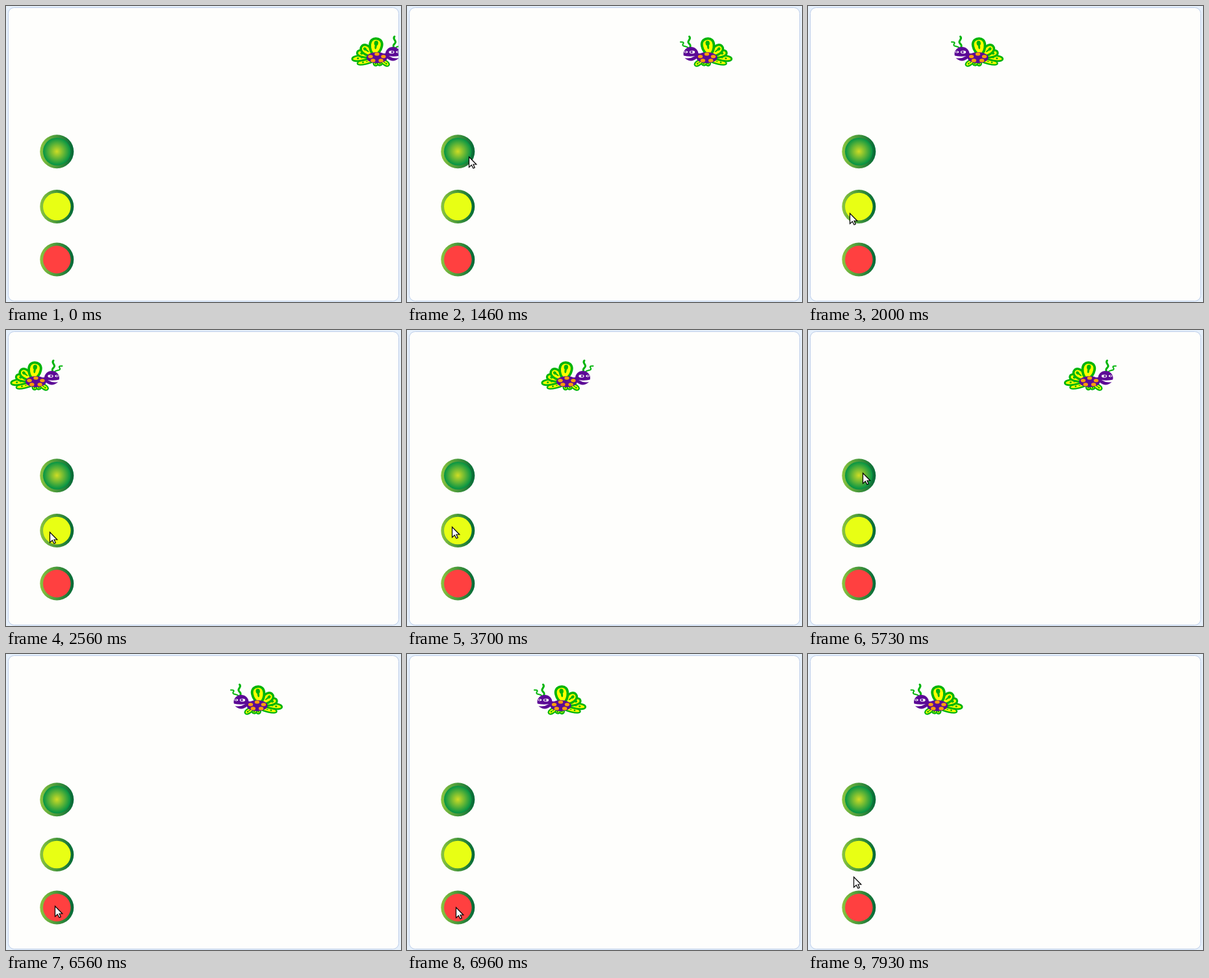
Write an HTML page with a canvas that moves like this. It is 608 px wide and 456 px high and loops after 8000 ms.

```html
<!DOCTYPE html>
<html lang="en">
<head>
<meta charset="utf-8">
<title>Butterfly and buttons</title>
<style>
html, body { margin: 0; width: 100%; height: 100%; overflow: hidden; background: #e6f0fb; }
canvas { display: block; width: 608px; height: 456px; }
</style>
</head>
<body>
<canvas id="stage" width="608" height="456"></canvas>
<script>
const ctx = document.getElementById('stage').getContext('2d');
const LOOP = 8000, STEP = 12.5, WIDTH = 82.5;
const GREEN = '#00b50a', YELLOW = '#ffff00', PURPLE = '#5c0a96', ORANGE = '#ff9d0a', WHITE = '#fefefc';

// The green button flies fast, yellow slows down, red stops
const phases = [
  { from: 1226, to: 3000, beat: 33.3 },
  { from: 3200, to: 5480, beat: 233.3 },
  { from: 5490, to: 7060, beat: 34 }
];

const moves = [
  { from: 430, to: 1060, x: 95, y: 232 },
  { from: 1500, to: 2030, x: 64, y: 320 },
  { from: 2200, to: 2900, x: 69, y: 303 },
  { from: 4400, to: 5130, x: 84, y: 220 },
  { from: 5930, to: 6600, x: 75, y: 390 },
  { from: 7630, to: 7930, x: 70, y: 343 }
];

function flight(t) {
  let steps = 0;
  for (const { from, to, beat } of phases)
    if (t >= from) steps += Math.floor((Math.min(t, to) - from) / beat) + 1;

  let x = 530, facing = 1;
  while (steps-- > 0) {
    x += STEP * facing;
    if (x > 520) { x = 507.5; facing = -1; }
    if (x < 10) { x = 5; facing = 1; }
  }
  return { x, facing };
}

function pointerAt(t) {
  let x = 0, y = 271;
  for (const m of moves) {
    const k = Math.min(1, Math.max(0, (t - m.from) / (m.to - m.from)));
    const e = k * k * (3 - 2 * k);
    x += (m.x - x) * e;
    y += (m.y - y) * e;
  }
  return { x, y };
}

function ellipse(x, y, rx, ry, fill, turn = 0) {
  ctx.beginPath();
  ctx.ellipse(x, y, rx, ry, turn, 0, Math.PI * 2);
  ctx.fillStyle = fill;
  ctx.fill();
}

function curve(path, width) {
  ctx.strokeStyle = GREEN;
  ctx.lineWidth = width;
  ctx.lineCap = 'round';
  ctx.stroke(new Path2D(path));
}

// Teardrop wing growing from its base at the given angle
function wing(x, y, angle, len, w, line) {
  ctx.save();
  ctx.translate(x, y);
  ctx.rotate(angle);
  ctx.beginPath();
  ctx.moveTo(0, 0);
  ctx.bezierCurveTo(len * .3, -w, len, -w * 1.25, len, 0);
  ctx.bezierCurveTo(len, w * 1.25, len * .3, w, 0, 0);
  ctx.fillStyle = YELLOW;
  ctx.fill();
  ctx.strokeStyle = GREEN;
  ctx.lineWidth = line;
  ctx.lineJoin = 'round';
  ctx.stroke();
  const spot = w * .29;
  ellipse(len * .74, 0, spot * 1.2, spot, GREEN);
  ellipse(len * .56, 0, spot * 1.4, spot * .5, GREEN);
  ctx.restore();
}

function wings() {
  for (let i = 3; i >= 0; i--) {
    const angle = .6 + .77 * i;
    wing(44, 36, angle, Math.min(34, 10.5 / Math.sin(angle)), 4.3, 2.2);
  }
  for (let i = 3; i >= 0; i--)
    wing(37, 32, -1.43 - 1.07 * Math.sqrt(i), 27 + 2.5 * i * (i - 2), 11 / (1 + .4 * i), 3.8 - .35 * i);
}

function body() {
  ellipse(41, 34.5, 16, 8.6, PURPLE);
  ellipse(53, 31.5, 6, 3.5, PURPLE, -.3);
  for (let i = 0; i < 5; i++) {
    const a = Math.PI * (.4 * i - .5);
    ellipse(41 + 10.5 * Math.cos(a), 34.5 + 5.5 * Math.sin(a), 3.7, 2.6, ORANGE);
  }
}

function head() {
  curve('M68 2 C64 6 72 9 69 12 C67 15 65 15 67 19', 3);
  curve('M81.5 10.5 C76 10 76 12 78 14 C79 18 74 16 70 19', 2);
  ellipse(65.5, 28.8, 11.5, 10.7, PURPLE);
  ctx.fillStyle = WHITE;
  ctx.fill(new Path2D('M59 32 Q68 34 79 31 V39 L75 35 Q67 37 59 32'));
  ellipse(63.5, 26, 4.2, 2.3, WHITE);
  ellipse(64.5, 26, 1.8, 1.4, PURPLE);
  ellipse(73, 25.8, 2.8, 1.6, WHITE);
  ellipse(73.5, 25.8, 1.1, 1, PURPLE);
}

function butterfly({ x, facing }) {
  ctx.save();
  ctx.beginPath();
  ctx.rect(4, 3, 600, 451);
  ctx.clip();
  ctx.translate(facing > 0 ? x : x + WIDTH, 45);
  ctx.scale(facing, 1);
  wings();
  body();
  head();
  ctx.restore();
}

function button(y, fill) {
  const ring = ctx.createLinearGradient(52, 0, 104.5, 0);
  ring.addColorStop(0, '#8cc63f');
  ring.addColorStop(1, '#006837');
  ellipse(78.3, y, 26, 26, ring);
  ellipse(78.3, y, 21.3, 21.3, fill);
}

function backdrop() {
  ctx.fillStyle = '#e6f0fb';
  ctx.fillRect(0, 0, 608, 456);
  ctx.beginPath();
  ctx.roundRect(3.5, 2.5, 601, 452, 9);
  ctx.fillStyle = WHITE;
  ctx.fill();
  ctx.strokeStyle = '#bccdea';
  ctx.lineWidth = 1;
  ctx.stroke();

  const glow = ctx.createRadialGradient(78.3, 224, 0, 78.3, 224, 21.5);
  glow.addColorStop(0, '#cfdc25');
  glow.addColorStop(1, '#009245');
  button(224.2, glow);
  button(309, '#e8ff14');
  button(390.6, '#ff4040');
}

function arrow({ x, y }) {
  ctx.save();
  ctx.translate(Math.round(x), Math.round(y));
  const shape = new Path2D('M.5 .5 V16.5 L4.3 13 L7 18 L9.3 17 L7 12 H11.8 Z');
  ctx.fillStyle = '#fff';
  ctx.fill(shape);
  ctx.strokeStyle = '#000';
  ctx.lineWidth = 1.2;
  ctx.stroke(shape);
  ctx.restore();
}

function draw(t) {
  backdrop();
  butterfly(flight(t));
  if (t >= moves[0].from) arrow(pointerAt(t));
}

const start = performance.now();
function tick() {
  draw((performance.now() - start) % LOOP);
  requestAnimationFrame(tick);
}
tick();
</script>
</body>
</html>
```
